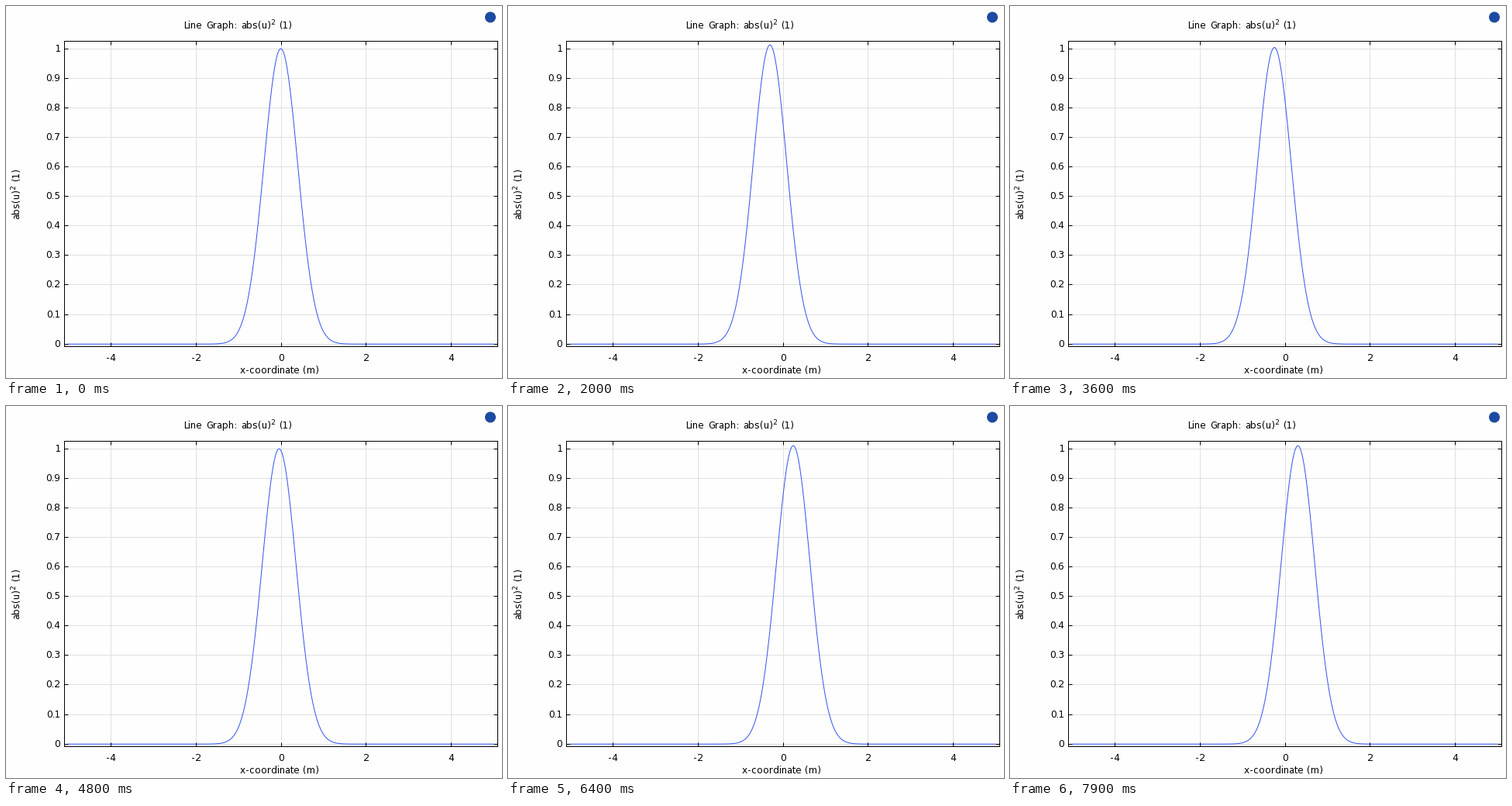
A matplotlib script for the animation above (8 s loop, 640 by 480 pixels).

```python
import matplotlib.pyplot as plt
import numpy as np
from matplotlib.animation import FuncAnimation
from matplotlib.patches import Circle

W, H, DPI = 640, 480, 100
FRAMES, STEP = 80, 100
PX = 72 / DPI
LEFT, RIGHT, TOP, BOTTOM = 75.5, 634.5, 45.5, 439.5
TICK = 5

plt.rcParams.update({
    "font.family": "DejaVu Sans",
    "text.hinting_factor": 1,
    "path.simplify": False,
})

fig = plt.figure(figsize=(W / DPI, H / DPI), dpi=DPI, facecolor="#fefefe")
ax = fig.add_axes([0, 0, 1, 1])
ax.set(xlim=(0, W), ylim=(H, 0))
ax.axis("off")


def to_x(x):
    return 355.0 + 54.88 * x


def to_y(y):
    return 436.2 - 381.2 * y


def pixel(v):
    return np.floor(v + 0.01) + 0.5


def label(x, y, text, size=12, **kw):
    ax.text(x, y, text, fontsize=size * PX, va="baseline", color="black",
            rotation_mode="anchor", **kw)


def squared(x, y, vertical=False):
    """Write abs(u), a raised 2 and the unit, along x or upwards."""
    for part, along, rise, size in (("abs(u)", 0, 0, 12), ("2", 38, 5, 9),
                                    ("(1)", 49, 0, 12)):
        if vertical:
            label(x - rise, y - along, part, size, rotation=90)
        else:
            label(x + along, y - rise, part, size)


# Lines sit on pixel centres, so snapping would move them off
def hline(y, x0, x1, color, z):
    ax.hlines(y, x0, x1, colors=color, lw=PX, zorder=z, snap=False)


def vline(x, y0, y1, color, z):
    ax.vlines(x, y0, y1, colors=color, lw=PX, zorder=z, snap=False)


# Grid, ticks and tick labels
for v in range(-4, 5, 2):
    x = pixel(to_x(v))
    vline(x, TOP, BOTTOM, "#e0e0e0", 1)
    vline(x, TOP, TOP + TICK, "black", 4)
    vline(x, BOTTOM - TICK, BOTTOM, "black", 4)
    label(x, 458, str(v), ha="center")

for i in range(11):
    y = pixel(to_y(i / 10))
    hline(y, LEFT, RIGHT, "#e0e0e0", 1)
    hline(y, LEFT, LEFT + TICK, "black", 4)
    hline(y, RIGHT - TICK, RIGHT, "black", 4)
    label(70, y + 3.5, f"{i / 10:g}", ha="right")

# Frame
for y in (TOP, BOTTOM):
    hline(y, LEFT - 0.5, RIGHT + 0.5, "black", 5)
for x in (LEFT, RIGHT):
    vline(x, TOP, BOTTOM, "black", 5)

# Titles
label(229, 29, "Line")
label(258, 29, "Graph:")
squared(303, 29)
squared(17, 275, vertical=True)
label(353.5, 474, "x-coordinate (m)", ha="center")

ax.add_patch(Circle((625, 14.5), 7, color="#1c4aa0", lw=0))

xs = np.linspace(-5, 5, 601)
curve, = ax.plot(to_x(xs) - 0.4, to_y(0 * xs), color="#3355f2", lw=PX,
                 zorder=3, snap=False)


def update(n):
    t = n * STEP / 1000
    center = -0.318 * np.sin(np.pi * t / 5)
    peak = (1 + 0.0118 * np.sin(np.pi * t / 5) ** 2
            + 0.003 * np.sin(2 * np.pi * t / 5))
    # The packet narrows as it grows, keeping its area
    density = peak * np.exp(-np.pi * (peak * (xs - center)) ** 2)
    curve.set_ydata(to_y(density))
    return curve,


anim = FuncAnimation(fig, update, frames=FRAMES, interval=STEP,
                     repeat=True, repeat_delay=0, blit=False)
plt.show()
```
